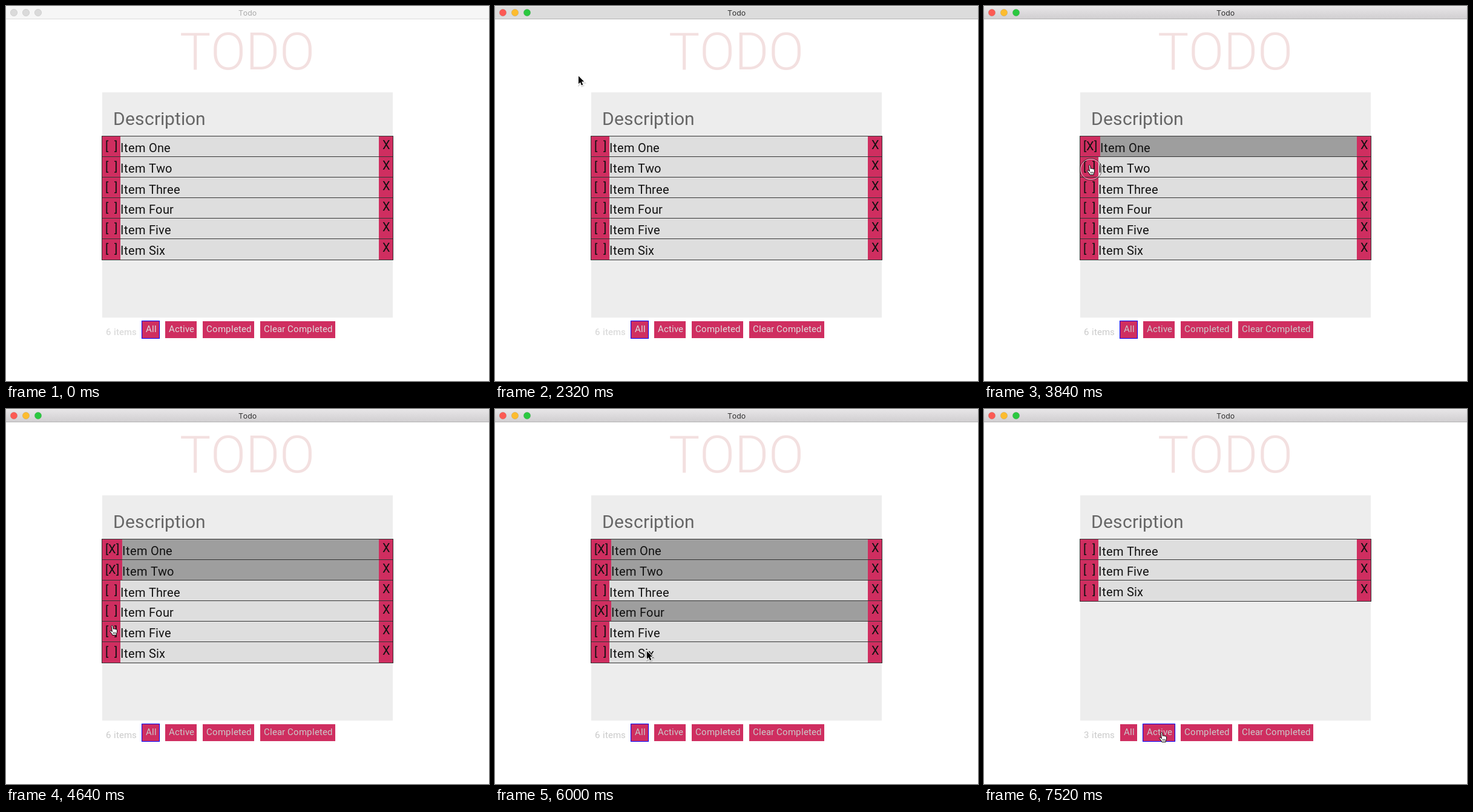
An HTML page that plays this animation: 798x621 px, repeating every 8000 ms.

```html
<!DOCTYPE html>
<html lang="en">
<head>
<meta charset="utf-8">
<title>Todo</title>
<style>
html, body { margin: 0; width: 100%; height: 100%; overflow: hidden; background: #fff; }
svg { display: block; }
text { font-family: Roboto, sans-serif; font-kerning: none; white-space: pre; }
.bar { font-family: Inter, sans-serif; }
</style>
</head>
<body>
<svg width="798" height="621" viewBox="0 0 798 621">
  <defs>
    <linearGradient id="chrome" x2="0" y2="1">
      <stop offset="0" stop-color="#e8e6e8"/>
      <stop offset="1" stop-color="#d1cfd1"/>
    </linearGradient>
    <path id="tip" d="M0 0V13L2.9 10.2 5 15.2 7.3 14.2 5.1 9.3H9.2Z"/>
  </defs>
  <g id="scene"></g>
  <g id="ring" fill="none">
    <circle r="18" stroke="#000" stroke-opacity=".55"/>
    <circle r="17" stroke="#fff" stroke-opacity=".7"/>
  </g>
  <g id="arrow">
    <use href="#tip" x=".6" y="1.6" fill="none" stroke="#000" stroke-opacity=".14" stroke-width="3"/>
    <use href="#tip" stroke="#fff" stroke-width="2" paint-order="stroke"/>
  </g>
  <g id="hand" stroke="#000" stroke-linejoin="round">
    <path d="M4 1.5c0-1.2 2.4-1.2 2.6 0l.7 5c.3-1 2-.9 2.2.2c.4-.8 2-.6 2.1.5c.5-.5 1.9-.2 1.9 1v3.3l-1.2 3v2H5.8l-.6-1.7-3.3-4.2c-.8-1.2.8-2.2 1.9-1.2l1.6 1.4z" fill="#fff"/>
    <path d="M7.3 11.5v3M9.1 11.5v3M10.9 11.5v3" fill="none" stroke-width=".8"/>
  </g>
</svg>
<script>
const LOOP = 8000, STEP = 80, PRESS = 160;
const HOVER = 1360, ACTIVATE = 1920, SHARPEN = 3120, FILTER = 7520;
const PINK = '#cf2e60';
const names = ['One', 'Two', 'Three', 'Four', 'Five', 'Six'];
const doneAt = { One: 3120, Two: 4000, Four: 5120 };
const releases = [...Object.values(doneAt), FILTER];

// Pointer moves: start, end, then where the tip comes to rest
const moves = [
  [1120, 1200, 33, 5],
  [1280, HOVER, 37, 16],
  [ACTIVATE, 2160, 131, 97],
  [2240, 2800, 177, 230],
  [3360, 3680, 172, 263],
  [4320, 4640, 173, 358],
  [4720, 4960, 170, 337],
  [5520, 6000, 251, 401],
  [6000, 6400, 283, 513],
  [6400, 6800, 288, 547],
  [6960, 7120, 291, 535]
];

const $ = id => document.getElementById(id);
const pen = document.createElement('canvas').getContext('2d');

// Glyphs advance by whole pixels
function advances(str, size, weight = 400) {
  pen.font = `${weight} ${size}px Roboto, sans-serif`;
  return [...str].map(c => Math.round(pen.measureText(c).width + 0.1));
}

const width = (str, size) => advances(str, size).reduce((a, b) => a + b, 0);

const rect = (x, y, w, h, fill) =>
  `<rect x="${x}" y="${y}" width="${w}" height="${h}" fill="${fill}"/>`;

const outline = (x, y, w, h, color) =>
  `<rect x="${x + 0.5}" y="${y + 0.5}" width="${w - 1}" height="${h - 1}" fill="none" stroke="${color}"/>`;

function text(str, x, y, size, fill, weight = 400) {
  const xs = advances(str, size, weight).map(w => (x += w) - w);
  return `<text x="${xs.join(' ')}" y="${y}" font-size="${size}" font-weight="${weight}" fill="${fill}">${str}</text>`;
}

function light(color, mark, x, t) {
  const hover = t >= HOVER && t <= ACTIVATE + STEP;
  const lit = hover || t >= ACTIVATE;
  return `<g transform="translate(${x} 11)">
    <circle r="5.7" fill="${lit ? color : '#dadada'}" stroke="#000" stroke-opacity=".12" stroke-width=".8"/>
    ${hover ? `<path d="${mark}" stroke="#000" stroke-width="1.3" opacity=".75"/>` : ''}</g>`;
}

function titleBar(t) {
  const on = t >= ACTIVATE;
  const fill = t >= SHARPEN ? 'url(#chrome)' : on ? '#dcdcdc' : '#f6f6f6';
  return rect(0, 0, 798, 21, fill) +
    rect(0, 0, 798, 1, on ? '#f0f0f0' : '#fafafa') +
    rect(0, 21, 798, 1, on ? '#b3b3b3' : '#dadada') +
    light('#fc5a54', 'M-2.2-2.2L2.2 2.2M2.2-2.2L-2.2 2.2', 13, t) +
    light('#fdbc2f', 'M-3.5 0H3.5', 33, t) +
    light('#2bc840', 'M-2 0V2H0ZM0-2H2V0Z', 53, t) +
    `<text class="bar" x="399" y="16" font-size="12.3" text-anchor="middle" fill="${on ? '#333' : '#ababab'}">Todo</text>`;
}

function row(name, i, t) {
  const y = 215 + 34 * i;
  const done = t >= doneAt[name];
  const mark = done ? '[X]' : '[  ]';
  const x = 169 + width(mark, 20);
  const drop = name.includes('h') ? 28 : 27;
  return rect(158, y, 482, 35, done ? '#9e9e9e' : '#dedede') +
    rect(159, y, x - 159, 35, PINK) + rect(616, y, 23, 35, PINK) +
    outline(158, y, 482, 36, '#333') +
    text(mark, 164, y + 24, 20, '#111') +
    text('Item ' + name, x, y + drop, 20, '#111') +
    text('X', 622, y + 22, 20, '#111');
}

function buttons(picked, color) {
  let x = 225;
  return ['All', 'Active', 'Completed', 'Clear Completed'].map(label => {
    const w = width(label, 15) + 10;
    const out = rect(x, 522, w, 28, PINK) +
      (label === picked ? outline(x - 1, 521, w + 2, 30, '#00f') : '') +
      text(label, x + 6, 540, 15, color);
    x += w + 10;
    return out;
  }).join('');
}

function scene(t) {
  const active = t >= FILTER;
  const shown = active ? names.filter(n => !doneAt[n]) : names;
  const sharp = t >= SHARPEN;
  const pale = sharp ? '#cacaca' : '#dcdcdc';
  return titleBar(t) +
    text('TODO', 287, 105, 86, '#f3e0e0', 300) +
    rect(159, 143, 480, 373, '#ededed') +
    text('Description', 177, 197, 30, '#666') +
    shown.map((n, i) => row(n, i, t)).join('') +
    text(`${shown.length} items`, 165, 545, 15, pale, sharp ? 400 : 500) +
    buttons(active ? 'Active' : 'All', pale);
}

function pointer(t) {
  if (t < 640 || t >= 800 && t < 1120) return null;
  if (t < 800) return { x: 0, y: 324 };
  let x = 38, y = 32;
  for (const [from, to, toX, toY] of moves) {
    const u = Math.min(1, Math.max(0, (t - from) / (to - from)));
    x += (toX - x) * u;
    y += (toY - y) * u;
  }
  return { x: Math.round(x), y: Math.round(y) };
}

function place(id, on, x, y) {
  $(id).setAttribute('visibility', on ? 'visible' : 'hidden');
  if (on) $(id).setAttribute('transform', `translate(${x} ${y})`);
}

function draw(t) {
  $('scene').innerHTML = scene(t);
  const p = pointer(t);
  const inside = (x, y, w, h) => p && p.x >= x && p.x < x + w && p.y >= y && p.y < y + h;
  const hand = inside(159, 215, 30, 205) || inside(263, 522, 52, 28);
  place('arrow', p && !hand, p?.x, p?.y);
  place('hand', hand, p?.x - 3, p?.y);
  place('ring', releases.some(r => t >= r - PRESS && t < r), p?.x + 4.5, p?.y + 7.5);
}

let start, last;
function tick(now) {
  start ??= now;
  const t = Math.floor(((now - start) % LOOP) / STEP) * STEP;
  if (t !== last) draw(last = t);
  requestAnimationFrame(tick);
}
draw(0);
requestAnimationFrame(tick);
</script>
</body>
</html>
```
